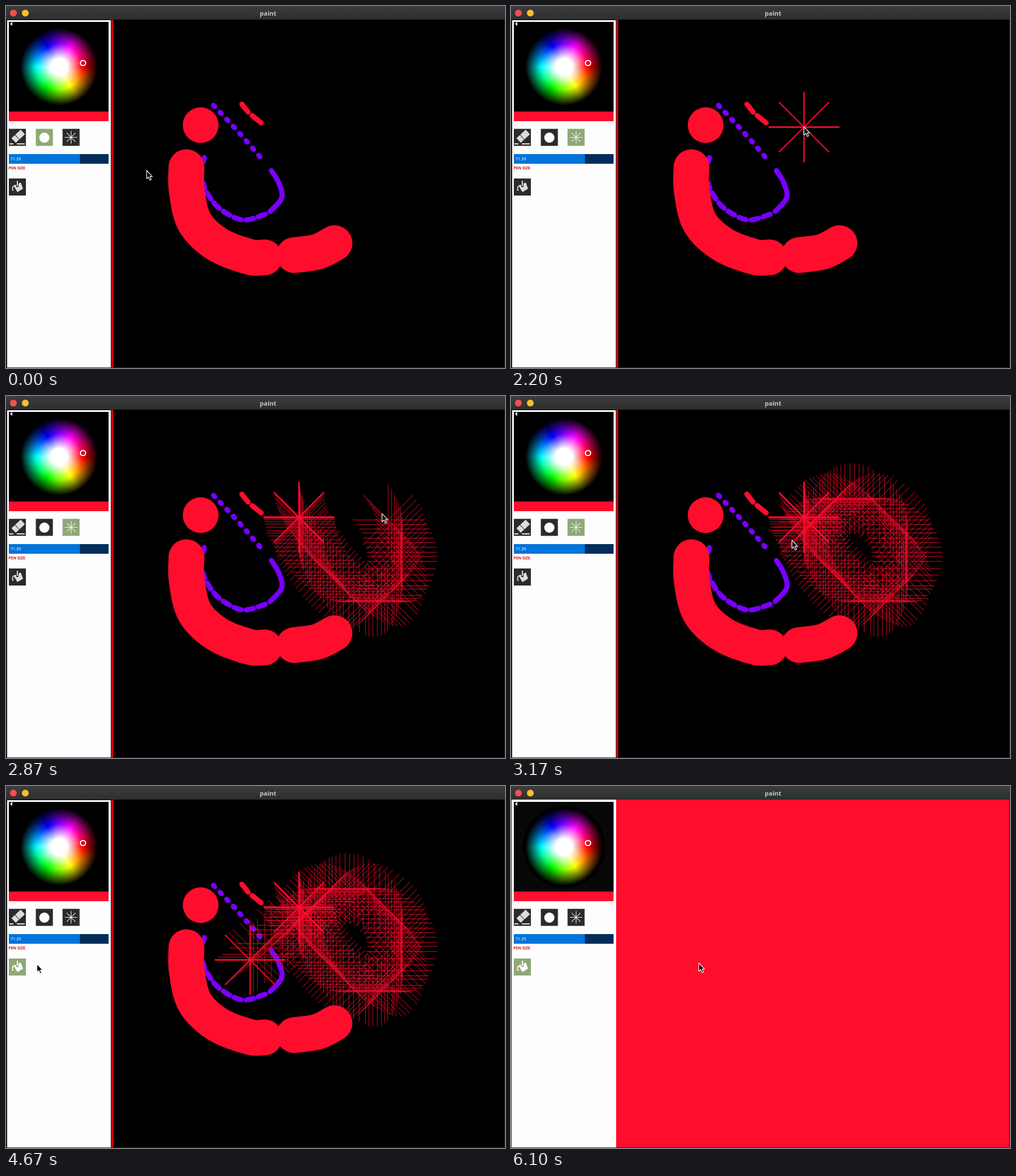
Write an HTML page with a canvas that moves like this. It is 878 by 638 pixels and loops after 6.17 s.

```html
<!DOCTYPE html>
<html>
<head>
<meta charset="utf-8">
<style>
html, body { margin: 0; width: 100%; height: 100%; overflow: hidden; background: #000; }
canvas { display: block; }
</style>
</head>
<body>
<canvas id="stage" width="878" height="638"></canvas>
<script>
const ctx = document.getElementById('stage').getContext('2d');
const LOOP = 6170, STAR_ON = 1420, BUCKET_ON = 4150, FILL_AT = 4985;
const PRESS = 2040, RELEASE = 3420, LAG = 18;
const RED = '#ff0d2d', DARK = '#2b2b2b', ACTIVE = '#8fa876';

// Pointer moves: start, end, points passed. Single-point moves are eased.
const home = [247, 290];
const moves = [
  [670, 1170, [[117, 225]]],
  [1400, 1820, [[515, 213]]],
  [2240, 3240, [[523, 245], [550, 291], [598, 341], [660, 360], [696, 293],
    [677, 224], [617, 182], [564, 190], [522, 231], [429, 306]]],
  [3430, 3920, [[19, 314]]],
  [4600, 4940, [[330, 312]]]
];

// Catmull-Rom curve through the points, u from 0 to 1
function spline(points, u) {
  const last = points.length - 1;
  const i = Math.min(Math.floor(u * last), last - 1), f = u * last - i;
  const at = n => points[Math.max(0, Math.min(last, n))];
  const [a, b, c, d] = [at(i - 1), at(i), at(i + 1), at(i + 2)];
  if (last === 1) return b.map((v, k) => v + (c[k] - v) * f);
  return b.map((v, k) => v + f / 2 * (c[k] - a[k] +
    f * (2 * a[k] - 5 * v + 4 * c[k] - d[k] + f * (3 * (v - c[k]) + d[k] - a[k]))));
}

function pointer(t) {
  let p = home;
  for (const [from, to, path] of moves) {
    if (t < from) break;
    let u = Math.min(1, (t - from) / (to - from));
    if (path.length === 1) u *= u * (3 - 2 * u);
    p = spline([p, ...path], u);
  }
  return p;
}

let seed = 7;
const random = () => (seed = seed * 16807 % 2147483647) / 2147483647;
const stamps = [];
for (let t = PRESS; t < RELEASE; t += 8 + 10 * random()) {
  const [x, y] = pointer(t - LAG);
  stamps.push({ t, x: Math.round(x) + .5, y: Math.round(y) + .5 });
}

function rect(color, x, y, w, h) {
  ctx.fillStyle = color;
  ctx.fillRect(x, y, w, h);
}

function disc(color, x, y, r) {
  ctx.fillStyle = color;
  ctx.beginPath();
  ctx.arc(x, y, r, 0, 7);
  ctx.fill();
}

function line(color, width, d) {
  ctx.strokeStyle = color;
  ctx.lineWidth = width;
  ctx.stroke(new Path2D(d));
}

function shape(color, d) {
  ctx.fillStyle = color;
  ctx.fill(new Path2D(d));
}

function label(text, font, color, x, y) {
  ctx.font = font;
  ctx.fillStyle = color;
  ctx.fillText(text, x, y);
}

function brush(color, width, points, dash = []) {
  ctx.strokeStyle = color;
  ctx.lineWidth = width;
  ctx.setLineDash(dash);
  ctx.beginPath();
  for (let i = 0; i <= 60; i++) ctx.lineTo(...spline(points, i / 60));
  ctx.stroke();
  ctx.setLineDash([]);
}

function star(x, y, r, color, width) {
  const d = r * Math.SQRT1_2;
  ctx.strokeStyle = color;
  ctx.lineWidth = width;
  ctx.beginPath();
  for (const [a, b] of [[r, 0], [0, r], [d, d], [d, -d]]) {
    ctx.moveTo(x - a, y - b);
    ctx.lineTo(x + a, y + b);
  }
  ctx.stroke();
}

function drawPainting(t) {
  const purple = '#7a00ff';
  ctx.lineCap = ctx.lineJoin = 'round';
  brush(purple, 9, [[365, 175], [409, 222], [453, 273]], [3, 14]);
  brush(purple, 9, [[467, 290], [480, 312], [485, 338], [465, 362]]);
  brush(purple, 9, [[456, 367], [416, 377], [376, 357], [354, 330], [347, 312]], [13, 9]);
  brush(purple, 9, [[349, 267], [347, 275]]);
  brush(RED, 9, [[415, 173], [426, 187]]);
  brush(RED, 9, [[433, 193], [449, 206]]);
  disc(RED, 342.5, 210, 31.5);
  brush(RED, 63, [[317.5, 284], [318, 325], [332, 381], [372, 420], [428, 442], [455, 443]]);
  brush(RED, 63, [[507, 439], [548, 433], [578, 418]]);
  ctx.lineCap = 'butt';
  for (const s of stamps) {
    if (s.t <= t) star(s.x, s.y, 62, 'rgba(255,13,45,.6)', 1.3);
  }
}

function drawPicker(t) {
  // The backdrop is wiped by the fill and darkens again
  const v = t < FILL_AT ? 0 : Math.round(255 * Math.exp((FILL_AT - t) / 310));
  rect(`rgb(${v},${v},${v})`, 5, 28, 175.5, 158);
  const x = 93.5, y = 107, r = 72.5;
  const hues = ctx.createConicGradient(0, x, y);
  for (let i = 0; i <= 6; i++) hues.addColorStop(i / 6, `hsl(${i * 60},100%,50%)`);
  disc(hues, x, y, r - 2);
  const shade = ctx.createRadialGradient(x, y, 0, x, y, r);
  shade.addColorStop(.2, '#fff');
  shade.addColorStop(.55, 'rgba(255,255,255,0)');
  shade.addColorStop(.55, 'rgba(0,0,0,0)');
  shade.addColorStop(.94, '#000');
  disc(shade, x, y, r);
  ctx.strokeStyle = '#fff';
  ctx.lineWidth = 2;
  ctx.beginPath();
  ctx.arc(135.5, 100.5, 4.6, 0, 7);
  ctx.stroke();
  shape('#fff', 'M7 31.5L11 28V35Z');
  rect(RED, 5, 186, 175.5, 17);
}

function drawTools(t) {
  const starOn = t >= STAR_ON && t < BUCKET_ON, bucketOn = t >= BUCKET_ON;
  const button = (on, x, y) => rect(on ? ACTIVE : DARK, x, y, 30, 30);

  button(false, 5, 216.5);
  ctx.save();
  ctx.translate(21.5, 229.5);
  ctx.rotate(-.75);
  rect('#dcdcdc', -11, -5.5, 8, 11);
  rect('#dcdcdc', -2, -5.5, 13, 11);
  ctx.restore();
  rect('#e9e3c8', 6, 242, 7, 2);
  rect('#e9e3c8', 19, 242, 14, 2);

  button(t < STAR_ON, 52.5, 216.5);
  disc('#fff', 67.5, 232, 9);
  button(starOn, 99.5, 216.5);
  star(114.5, 231.5, 11, '#f0f0f0', 1.1);

  rect('#002d5a', 5, 261, 175.5, 17);
  rect('#0074d9', 5, 261, 125, 17);
  label('71.29', '7.3px Roboto, sans-serif', '#fff', 8, 272);
  label('PEN SIZE', '500 7px Roboto, sans-serif', '#c40000', 4.5, 288);

  button(bucketOn, 5, 304);
  const ink = bucketOn ? '#fff' : '#dcdcdc';
  shape(ink, 'M13 316L18 315V319H22V313L26 311 30 322 20 328Z');
  line(ink, 2, 'M20 308V317M13 317L11 322');
  disc(ink, 12, 324, 1.6);
}

function drawWindow() {
  const bar = ctx.createLinearGradient(0, 0, 0, 24);
  bar.addColorStop(0, '#3d3d3d');
  bar.addColorStop(1, '#2e2e2e');
  rect(bar, 0, 0, 878, 24);
  disc('#f2504e', 13, 12.5, 6);
  disc('#fbbd2e', 34, 12.5, 6);
  ctx.textAlign = 'center';
  label('paint', 'bold 11px "Noto Sans", sans-serif', '#c6c6c6', 461, 17);
  ctx.textAlign = 'left';
  ctx.strokeStyle = DARK;
  ctx.lineWidth = 1;
  ctx.strokeRect(.5, 23.5, 877, 614);
}

function drawPointer(t) {
  ctx.save();
  ctx.translate(...pointer(t));
  const arrow = 'M.5 0V14.5L3.8 11.4 6.2 17 8.6 16 6.2 10.6H10.5Z';
  shape('#000', arrow);
  line('#f4f4f4', 1.2, arrow);
  ctx.restore();
}

function draw(t) {
  const filled = t >= FILL_AT;
  rect(filled ? RED : '#000', 0, 0, 878, 638);
  if (filled) {
    rect('#fdfdfd', 1, 24, 184, 613);
  } else {
    drawPainting(t);
    rect('#fdfdfd', 2, 25, 182.5, 612);
    rect('#ec0000', 185.5, 24, 3, 613);
  }
  drawPicker(t);
  drawTools(t);
  drawWindow();
  drawPointer(t);
}

const start = performance.now();
function tick() {
  draw((performance.now() - start) % LOOP);
  requestAnimationFrame(tick);
}
tick();
</script>
</body>
</html>
```
